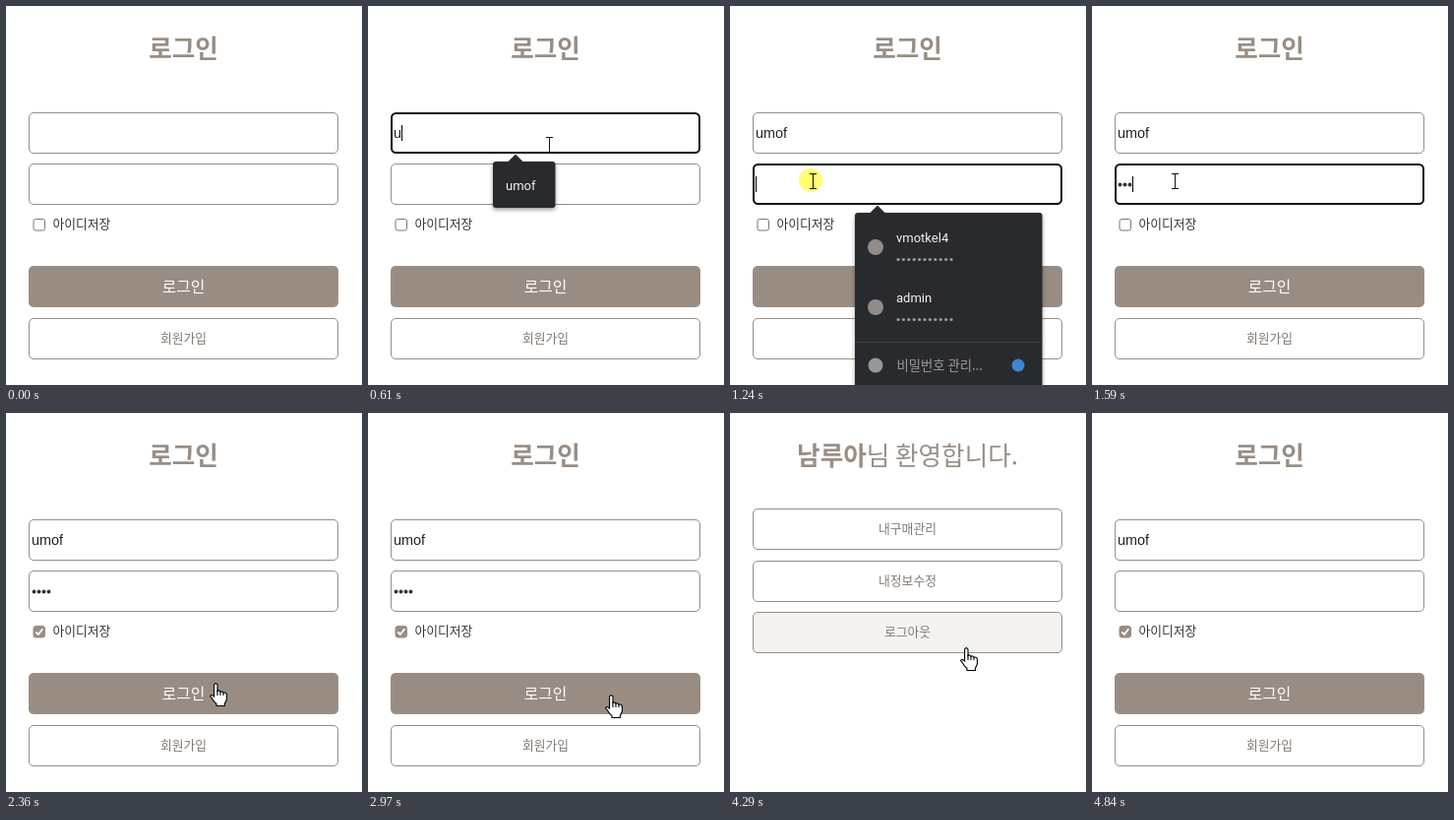
An HTML page with a canvas for the animation above (5.11 s loop, 362x385 px).

```html
<!DOCTYPE html>
<html lang="ko">
<head>
<meta charset="utf-8">
<title>로그인</title>
<style>
  html, body { margin: 0; width: 100%; height: 100%; overflow: hidden; background: #fff; }
  canvas { display: block; }
</style>
</head>
<body>
<canvas id="stage" width="362" height="385"></canvas>
<script>
const ctx = document.getElementById('stage').getContext('2d');
const LOOP = 5110, TICK = LOOP / 74;
const KOREAN = '"Noto Sans CJK KR", "Noto Sans CJK", sans-serif';
const FIELD = '"Liberation Sans", Arial, sans-serif';
const MENU = 'Roboto, "Noto Sans CJK KR", sans-serif';
const TAUPE = '#998d83', PANEL = '#292a2d', MUTED = '#9a9ba0';
const USER = 'umof', CENTER = 180.5;

// Pointer hot spot: tick, x, y
const PATH = [
  [1, 262, 250], [4, 182, 140], [14, 182, 140], [16, 82, 177], [24, 82, 177],
  [28, 35, 222], [30, 35, 222], [32, 144, 240], [34, 213, 274], [36, 237, 283],
  [38, 247, 286], [49, 247, 286], [52, 240, 238], [64, 240, 238], [70, 356, 386]
];
const PRESSES = [[4, 6], [17, 19], [28, 30], [42, 43], [56, 58]];
const USER_KEYS = [9, 10, 12, 13], PASSWORD_KEYS = [21, 22, 23, 24];

const HAND = new Path2D('M4.6 14V2Q6.3-.8 8 2V8.5Q10 7 11 9.3Q13 8 14 10.3Q16.6 9.4 17.4 12V17Q16.6 19.5 15.4 21V23.5H7V21.5Q4 19 2.5 16L.6 13.6Q1.6 11.2 4.6 14Z');
const KNUCKLES = new Path2D('M8 8V13M11 9V13M14 10V13');
const ARROW = new Path2D('M.5.5V16L4 12.7L6.8 18.8L9.2 17.7L6.6 11.8H11.5Z');

const between = (k, from, to) => k >= from && k < to;
const countKeys = (keys, k) => keys.filter(key => k >= key).length;

function text(str, x, y, size, color, { font = KOREAN, weight = 400, align = 'left' } = {}) {
  ctx.font = `${weight} ${size}px ${font}`;
  ctx.textAlign = align;
  ctx.fillStyle = color;
  ctx.fillText(str, x, y);
  return ctx.measureText(str).width;
}

function box(x, y, w, h, r, fill, stroke, width = 1) {
  ctx.beginPath();
  ctx.roundRect(x, y, w, h, r);
  if (fill) { ctx.fillStyle = fill; ctx.fill(); }
  if (stroke) { ctx.strokeStyle = stroke; ctx.lineWidth = width; ctx.stroke(); }
}

function circle(x, y, r, color) {
  ctx.beginPath();
  ctx.arc(x, y, r, 0, 7);
  ctx.fillStyle = color;
  ctx.fill();
}

function dots(n, x, y, gap, r, color) {
  for (let i = 0; i < n; i++) circle(x + i * gap, y, r, color);
}

function outline(path, fill) {
  ctx.lineWidth = 1.1;
  ctx.strokeStyle = '#000';
  ctx.fillStyle = fill;
  ctx.fill(path);
  ctx.stroke(path);
}

function button(label, y, fill = '#fff') {
  box(23.5, y + .5, 314, 41, 4.5, fill, TAUPE);
  text(label, CENTER, y + 25, 12.8, '#857a72', { align: 'center' });
}

function field(y, focused) {
  if (focused) box(24, y + 1, 313, 40, 4.5, '#fff', '#101010', 2);
  else box(23.5, y + .5, 314, 41, 4.5, '#fff', TAUPE);
}

function caret(x, y) {
  ctx.fillStyle = '#000';
  ctx.fillRect(Math.round(x), y + 13, 1, 16);
}

function checkbox(checked) {
  box(28, 216.5, 11.5, 11.5, 2.2, checked ? TAUPE : '#fff', checked ? TAUPE : '#767676');
  if (!checked) return;
  ctx.beginPath();
  ctx.moveTo(30.3, 222.5);
  ctx.lineTo(32.8, 225);
  ctx.lineTo(37.3, 219.3);
  ctx.strokeStyle = '#fff';
  ctx.lineWidth = 1.8;
  ctx.stroke();
}

function panel(y, w, h) {
  ctx.save();
  ctx.shadowColor = 'rgba(0,0,0,.4)';
  ctx.shadowBlur = 4;
  ctx.shadowOffsetY = 2;
  box(127, y, w, h, 3, PANEL);
  ctx.restore();
  ctx.beginPath();
  ctx.moveTo(142, y + .5);
  ctx.lineTo(150, y - 7.5);
  ctx.lineTo(158, y + .5);
  ctx.fillStyle = PANEL;
  ctx.fill();
}

function accountMenu(y) {
  panel(y, 190.5, 179);
  ['vmotkel4', 'admin'].forEach((name, i) => {
    const top = y + i * 61;
    circle(148, top + 35, 8, '#918c89');
    text(name, 169, top + 30, 13, '#f1f1f1', { font: MENU });
    dots(11, 171, top + 47.5, 5.4, 1.6, MUTED);
  });
  ctx.fillStyle = '#404145';
  ctx.fillRect(127, y + 131, 190.5, 1);
  circle(148, y + 155, 7.5, '#94979b');
  text('비밀번호 관리...', 169.5, y + 159.5, 13.3, MUTED);
  circle(293, y + 155, 6.5, '#3f86d0');
}

function loginPage(k) {
  const returning = k >= 65;
  const typed = returning ? USER.length : countKeys(USER_KEYS, k);
  const hidden = returning ? 0 : countKeys(PASSWORD_KEYS, k);
  const onUser = between(k, 5, 17), onPassword = between(k, 17, 28);

  text('로그인', CENTER, 53, 25.6, TAUPE, { weight: 700, align: 'center' });
  field(108, onUser);
  const width = text(USER.slice(0, typed), 26, 134, 14.4, '#222', { font: FIELD });
  if (onUser) caret(26 + width, 108);
  field(160, onPassword);
  dots(hidden, 28.5, 181.5, 5, 1.9, '#333');
  if (onPassword) caret(26 + hidden * 5, 160);
  checkbox(k >= 29);
  text('아이디저장', 47.5, 226, 12.8, '#3a3432');
  box(23, 264, 315, 42, 5, TAUPE);
  text('로그인', CENTER, 291, 15.8, '#fff', { align: 'center' });
  button('회원가입', 317);

  if (between(k, 6, 9)) accountMenu(158);
  if (between(k, 9, 14)) {
    panel(158, 63.5, 47);
    text(USER, 140, 187, 13, '#f1f1f1', { font: MENU });
  }
  if (between(k, 18, 21)) accountMenu(210);
}

function memberPage(k) {
  const name = '남루아', greeting = '님 환영합니다.';
  ctx.font = `400 25.6px ${KOREAN}`;
  const rest = ctx.measureText(greeting).width;
  ctx.font = `700 25.6px ${KOREAN}`;
  const left = CENTER - (ctx.measureText(name).width + rest) / 2;
  const width = text(name, left, 53, 25.6, TAUPE, { weight: 700 });
  text(greeting, left + width, 53, 25.6, TAUPE);
  button('내구매관리', 97);
  button('내정보수정', 150);
  button('로그아웃', 202, k >= 56 ? '#f5f3f1' : '#fff');
}

function pointerAt(k) {
  const next = PATH.findIndex(p => p[0] > k);
  const [k0, x0, y0] = PATH[next - 1], [k1, x1, y1] = PATH[next];
  const u = (k - k0) / (k1 - k0);
  return [x0 + (x1 - x0) * u, y0 + (y1 - y0) * u];
}

function pointerKind(k, y, member) {
  if (member) return k < 50 || y < 244 ? 'hand' : 'arrow';
  if (between(y, 108, 150) || between(y, 160, 202)) return 'beam';
  return between(y, 264, 306) || between(y, 317, 359) ? 'hand' : 'arrow';
}

function pointer(k, member) {
  if (!between(k, 1, 70)) return;
  const [x, y] = pointerAt(k);
  if (PRESSES.some(([from, to]) => between(k, from, to))) circle(x, y, 12, 'rgba(255,255,40,.65)');
  const kind = pointerKind(k, y, member);
  ctx.save();
  if (kind === 'beam') {
    ctx.translate(Math.round(x) + 2, Math.round(y) + 1);
    ctx.fillStyle = '#111';
    ctx.fillRect(0, -8, 1, 16);
    for (const end of [-8, 7]) {
      ctx.fillRect(-3, end, 3, 1);
      ctx.fillRect(1, end, 3, 1);
    }
  } else if (kind === 'hand') {
    ctx.translate(x - 6, y);
    outline(HAND, '#fff');
    ctx.stroke(KNUCKLES);
  } else {
    ctx.translate(x, y);
    outline(ARROW, '#fff');
  }
  ctx.restore();
}

function draw() {
  const k = Math.floor((performance.now() % LOOP + 12) / TICK);
  const member = between(k, 46, 65);
  ctx.fillStyle = '#fff';
  ctx.fillRect(0, 0, 362, 385);
  (member ? memberPage : loginPage)(k);
  pointer(k, member);
  requestAnimationFrame(draw);
}
draw();
</script>
</body>
</html>
```
